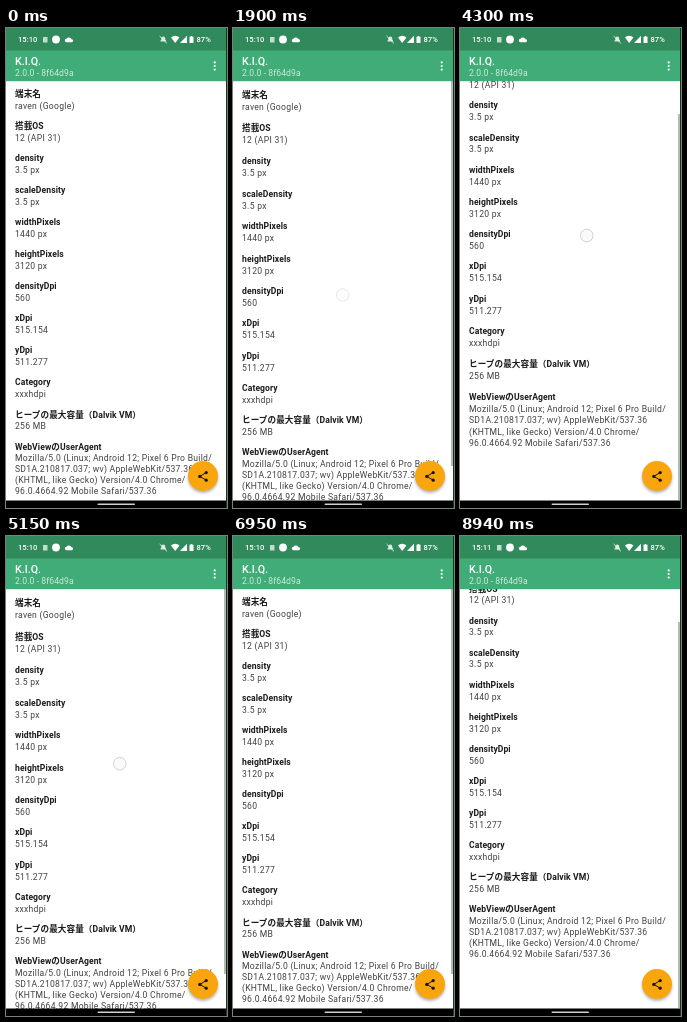
An HTML page that plays this animation: 221 by 480 pixels, repeating every 9020 ms.

```html
<!DOCTYPE html>
<html lang="ja">
<head>
<meta charset="utf-8">
<title>Device info</title>
<style>
  html, body { margin: 0; width: 100%; height: 100%; overflow: hidden; background: #fff; }
  svg { display: block; width: 221px; height: 480px; }
  text { font-family: Roboto, "Noto Sans CJK JP", "Noto Sans CJK", sans-serif; white-space: pre; }
  .label { font-size: 8.6px; font-weight: 600; letter-spacing: .08px; fill: #1c1c1c; }
  .value { font-size: 8.6px; letter-spacing: .27px; fill: #404040; }
  .status { font-size: 7.6px; font-weight: 500; fill: #fff; }
</style>
</head>
<body>
<svg viewBox="0 0 221 480">
  <defs>
    <filter id="soft" x="-50%" y="-50%" width="200%" height="200%"><feGaussianBlur stdDeviation="1.8"/></filter>
  </defs>

  <rect width="221" height="480" fill="#fff"/>
  <g id="list"></g>
  <rect id="bar" x="218" width="2" height="386" fill="#000" fill-opacity=".28"/>

  <circle cx="197" cy="450" r="15" opacity=".3" filter="url(#soft)"/>
  <circle cx="197" cy="448" r="15" fill="#f9a50d"/>
  <g fill="#1a1206">
    <path d="M200.2 444.6L193.8 448.4L200.2 452.2" fill="none" stroke="#1a1206"/>
    <circle cx="200.2" cy="444.6" r="1.6"/>
    <circle cx="193.8" cy="448.4" r="1.6"/>
    <circle cx="200.2" cy="452.2" r="1.6"/>
  </g>

  <circle id="touch" r="6.3" fill="#fafafd" stroke="#d0d0d6"/>

  <rect y="53" width="221" height="1" opacity=".1"/>
  <rect y="22" width="221" height="31" fill="#40ac77"/>
  <rect width="221" height="22.5" fill="#318a5c"/>
  <text x="9" y="36.6" font-size="10.7" font-weight="500" fill="#fff">K.I.Q.</text>
  <text x="9" y="48.3" font-size="8.6" letter-spacing=".08" fill="#cdeadb">2.0.0 - 8f64d9a</text>
  <g fill="#fff">
    <circle cx="208.7" cy="34.4" r="1.1"/><circle cx="208.7" cy="38" r="1.1"/><circle cx="208.7" cy="41.6" r="1.1"/>
    <text id="clock" class="status" x="12" y="14.3">15:10</text>
    <rect x="37" y="9" width="4.5" height="5.5" opacity=".7"/>
    <circle cx="50" cy="11.5" r="3.9"/>
    <path d="M60.5 14.2a1.7 1.7 0 0 1 0-3.4a2.8 2.8 0 0 1 5 .4a1.5 1.5 0 0 1 .2 3z"/>
    <path d="M154.5 13.5V12.6l.8-.8V10.5a2 2 0 0 1 4 0v1.3l.8.8v.9z" opacity=".8"/>
    <path d="M153.6 8L161 15.4" stroke="#fff" stroke-width=".8"/>
    <path d="M165 9.4a6.3 6.3 0 0 1 8.4 0L169.2 15z"/>
    <path d="M181 7.8V15H174z"/>
    <path d="M183.5 8.8h1.2v-.9h1.6v.9h1.2V15h-4z"/>
    <text class="status" x="190.5" y="14.3">87%</text>
  </g>

  <rect y="472.5" width="221" height="8"/>
  <rect x="91.5" y="475.5" width="37.5" height="1.5" rx=".75" fill="#d0d0d0"/>
  <rect x="220" width="1" height="480" fill="#0c3d14"/>
</svg>
<script>
const LOOP = 9020, LAST = 8940, STEP = 50;
const TOP = 52, BOTTOM = 472, MAX_SCROLL = 45.5, ROW = 32.05, LINE = 11;

// Each burst is two pulls in a row: 1 drags the list down, -1 up.
const bursts = [[400, 1], [2850, -1], [4750, 1], [7000, -1]];
const PULL = 950, HOLD = 520, TRAVEL = 170;

const rows = [
  ["端末名", "raven (Google)"],
  ["搭載OS", "12 (API 31)"],
  ["density", "3.5 px"],
  ["scaleDensity", "3.5 px"],
  ["widthPixels", "1440 px"],
  ["heightPixels", "3120 px"],
  ["densityDpi", "560"],
  ["xDpi", "515.154"],
  ["yDpi", "511.277"],
  ["Category", "xxxhdpi"],
  ["ヒープの最大容量（Dalvik VM）", "256 MB"],
  ["WebViewのUserAgent",
    "Mozilla/5.0 (Linux; Android 12; Pixel 6 Pro Build/",
    "SD1A.210817.037; wv) AppleWebKit/537.36",
    "(KHTML, like Gecko) Version/4.0 Chrome/",
    "96.0.4664.92 Mobile Safari/537.36"],
];

const $ = id => document.getElementById(id);
const bar = $("bar"), touch = $("touch"), clock = $("clock");
const clamp = v => Math.min(1, Math.max(0, v));
const set = (el, attrs) => Object.entries(attrs).forEach(([k, v]) => el.setAttribute(k, v));

const texts = rows.flatMap(([label, ...lines], i) => {
  const y = 69 + i * ROW;
  return [addText("label", y, label),
    ...lines.map((line, k) => addText("value", y + 11.8 + k * LINE, line))];
});

function addText(kind, y, content) {
  const el = document.createElementNS("http://www.w3.org/2000/svg", "text");
  set(el, { class: kind, x: 9 });
  el.textContent = content;
  $("list").append(el);
  return { el, y };
}

// List and finger state: the drag scrolls first, then stretches the list.
function pose(t) {
  const n = bursts.findLastIndex(([start]) => t >= start);
  if (n < 0) return { scroll: 0, stretch: 0, dir: 1, travel: 0, alpha: 0 };
  const [start, dir] = bursts[n];
  const pull = Math.floor((t - start) / PULL);
  const active = pull < 2;
  const p = active ? (t - start) % PULL : PULL;
  const travel = TRAVEL * clamp(p / HOLD);
  const gap = n > 0 && pull === 0 ? MAX_SCROLL : 0;
  const left = Math.max(0, gap - travel);
  const excess = Math.max(0, travel - gap);
  const recoil = active ? Math.exp(-Math.max(0, p - HOLD) / 120) : 0;
  return {
    scroll: dir > 0 ? left : MAX_SCROLL - left,
    stretch: 7.5 * (1 - Math.exp(-excess / 35)) * recoil,
    dir, travel,
    alpha: active ? clamp((p + 50) / 100) * clamp((HOLD + 60 - p) / 60) : 0,
  };
}

function draw(t) {
  const { scroll, stretch, dir, travel, alpha } = pose(t);
  for (const { el, y } of texts) {
    const top = y - scroll;
    const depth = Math.max(0, dir > 0 ? top - TOP : BOTTOM - top);
    el.setAttribute("y", top + dir * stretch * (1 - Math.exp(-depth / 110)));
  }
  set(bar, {
    y: TOP + scroll / MAX_SCROLL * 34,
    opacity: t < 400 ? 0 : t < 2850 ? clamp((2550 - t) / 250) : 1,
  });
  set(touch, {
    cx: 120 - 7 * dir + (t - 4500) / 800,
    cy: 234 + dir * (travel - 137),
    opacity: alpha,
  });
  clock.textContent = t < 8000 ? "15:10" : "15:11";
}

function tick() {
  const t = performance.now() % LOOP;
  draw(t >= LAST ? LAST : Math.floor(t / STEP) * STEP);
  requestAnimationFrame(tick);
}
tick();
</script>
</body>
</html>
```
